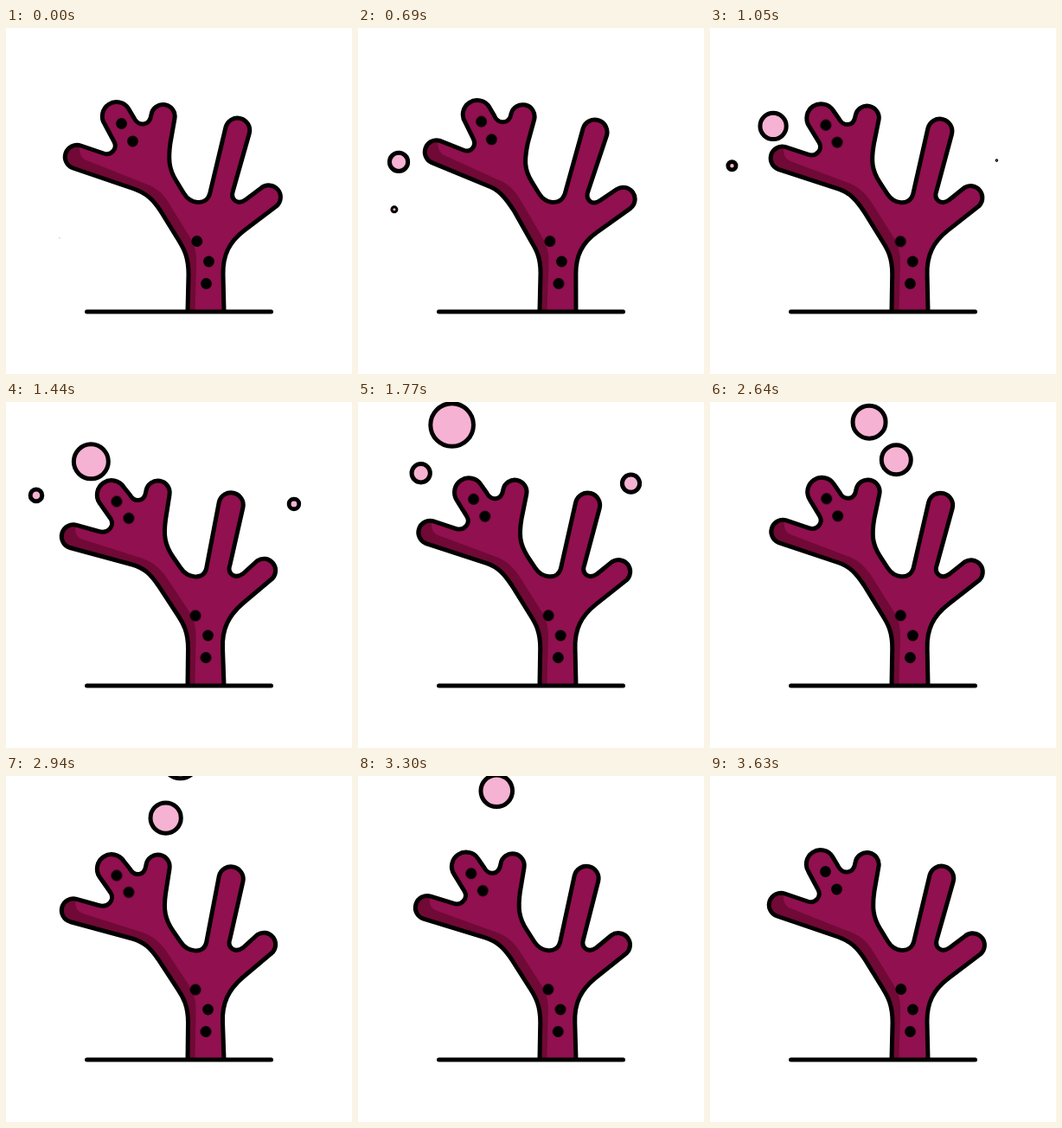
An HTML page without scripts that plays this animation: 400 px wide and 400 px high, repeating every 5750 ms.

```html
<!DOCTYPE html>
<html lang="en">
<head>
<meta charset="utf-8">
<title>Swaying coral</title>
<style>
  html, body { margin: 0; width: 100%; height: 100%; overflow: hidden; background: #fff; }
  svg { display: block; width: 100vw; height: 100vh; }

  /* coral */
  .body, .shade, .dot { animation: 5750ms cubic-bezier(.37, 0, .63, 1) infinite; }
  .body { animation-name: body; }
  .shade { animation-name: shade; fill: #700936; }
  .dot { animation-name: dot; }
  .fill { fill: #91104f; }
  .line { fill: none; stroke: #000; stroke-width: 5; stroke-linejoin: round; }

  @keyframes body {
    0%, 63.13%, 100% {
      d: path("M210 327L211 285C211 265 206 256 200 246L179 212C170 198 162 191 148 186L77.5 162A13.6 13.6 0 0 1 86.5 136L113 145C122 148 129 139 125 131.5L114 111A16.2 16.2 0 0 1 141.5 93L148 104C153 114 166 114 168 100A13.6 13.6 0 0 1 195 104.5L190 133C187.5 151 188 163 197 177L205.5 191C213 203.5 231 206 235.5 192L254 114.7A14 14 0 0 1 281.3 121.7L262.5 188C259 199 268 205 277 198.5L295 185A13.6 13.6 0 0 1 312.5 206L275.5 234C258.5 247 250.5 262 251 285L252 327");
    }
    9.65%, 39.4% {
      d: path("M210 327L211 285C211.5 266 206.5 257 200.5 247L181 212C172 198 165 189 155 184L84.8 154.3A13.6 13.6 0 0 1 94.8 129.3L123.2 140.7C132 144 138 135 134 127.5L125 108.7A16.2 16.2 0 0 1 152.5 90.5L158.5 101C162 110.5 176 112 178 99A13.6 13.6 0 0 1 204.7 105.5L197 133C193 152 192.5 163 201 177L209.5 191C217 203.5 234 206 239.5 192L261 116.3A14.2 14.2 0 0 1 288.3 124.6L266.7 188C262.5 199 271 206 280.5 199.3L299.5 186.7A13.6 13.6 0 0 1 315.5 208.7L277 236C259.5 248 251.5 263 252 286L252 327");
    }
    24.7%, 51.5% {
      d: path("M210 327L210.5 285C210.5 266 205 256 199 247L176 212C167 199 160 192 146 188L74 168.5A13.6 13.6 0 0 1 81.7 142.4L107 149.5C118 153 126 143 121 135L108 116.5A16.2 16.2 0 0 1 136 98.2L143 107C148 116 160 117 162 102.3A13.6 13.6 0 0 1 189 107.3L184.5 136C182 154 183.5 165 193 179L202 192C210 204 228 206 231.5 193L246.3 115.5A14.2 14.2 0 0 1 274 121.7L259 188C255 199 265 205 274 198.5L290.5 183.5A13.6 13.6 0 0 1 308.5 203.5L273.5 233C257.5 247 249.5 262 250.5 285L252 327");
    }
  }

  @keyframes shade {
    0%, 63.13%, 100% {
      d: path("M210 327L211 285C211 265 206 256 200 246L179 212C170 198 162 191 148 186L77.5 162A13.6 13.6 0 0 1 85 136C84 146 88 151 92.5 152.7L156 178C172 183 181 190 188 202L212 241C219 253 220.5 260 220 275L218.5 327Z");
    }
    9.65%, 39.4% {
      d: path("M210 327L211 285C211.5 266 206.5 257 200.5 247L181 212C172 198 165 189 155 184L84.8 154.3A13.6 13.6 0 0 1 93.3 129.3C92.5 139 95.5 144 100 146.3L162 175C176 180 183 189.5 190 202L212.5 241C219.5 253 221 261 220.5 275L218.5 327Z");
    }
    24.7%, 51.5% {
      d: path("M210 327L210.5 285C210.5 266 205 256 199 247L176 212C167 199 160 192 146 188L74 168.5A13.6 13.6 0 0 1 80.5 142.4C79 153 83 157 89 159L152 179C168 183.5 177 191 185 202L211 241C218 253 220 260 219.5 275L218.5 327Z");
    }
  }

  /* each dot carries its own right and left offset */
  @keyframes dot {
    0%, 63.13%, 100% { transform: translate(0, 0); }
    9.65%, 39.4% { transform: var(--r); }
    24.7%, 51.5% { transform: var(--l); }
  }

  /* bubbles */
  .bubble { fill: #f6b2d3; stroke: #000; stroke-width: 5; animation: 5750ms linear infinite; }
  .b1 { animation-name: b1; }
  .b2 { animation-name: b2; }
  .b3 { animation-name: b3; }

  @keyframes b1 {
    0% { cx: 62px; cy: 243px; r: .3px; stroke-width: .2px; }
    4% { cx: 53px; cy: 214px; r: 2.7px; stroke-width: 3.4px; }
    8% { cx: 45px; cy: 184px; r: 6.6px; stroke-width: 5px; }
    10.4% { cx: 44.5px; cy: 166px; r: 9.2px; }
    12% { cx: 47px; cy: 155px; r: 10.6px; }
    18.5% { cx: 74px; cy: 112px; r: 15.3px; }
    25.04% { cx: 98.3px; cy: 69px; r: 20px; }
    31% { cx: 109px; cy: 25px; r: 25px; }
    37.04% { cx: 114px; cy: -20.7px; r: 29.5px; }
    41.7%, 100% { cx: 116px; cy: -58px; r: 33px; stroke-width: 5px; }
  }

  @keyframes b2 {
    0%, 7.3% { cx: 57px; cy: 243px; r: 0; stroke-width: 0; }
    12% { cx: 42px; cy: 210px; r: 3px; stroke-width: 3px; }
    16% { cx: 28px; cy: 177px; r: 4.3px; stroke-width: 4.6px; }
    20.87% { cx: 22.5px; cy: 139px; r: 5px; stroke-width: 5px; }
    25.04% { cx: 34.8px; cy: 108px; r: 6.8px; }
    31.3% { cx: 76px; cy: 80px; r: 11px; }
    37.04% { cx: 117.8px; cy: 55.2px; r: 14.1px; }
    45.91% { cx: 184px; cy: 23.3px; r: 19px; }
    52.17%, 100% { cx: 205px; cy: -26px; r: 21px; stroke-width: 5px; }
  }

  @keyframes b3 {
    0%, 16.5% { cx: 330px; cy: 162px; r: 0; stroke-width: 0; }
    20.87% { cx: 333.5px; cy: 140px; r: 3px; stroke-width: 3px; }
    25.04% { cx: 333px; cy: 118px; r: 5.8px; stroke-width: 4.8px; }
    31.3% { cx: 314px; cy: 92px; r: 10.5px; stroke-width: 5px; }
    37.04% { cx: 275.8px; cy: 71px; r: 15.3px; }
    41.5% { cx: 245px; cy: 70px; r: 16.3px; }
    45.91% { cx: 215.4px; cy: 66.8px; r: 17px; }
    51.6% { cx: 182px; cy: 47px; r: 17.7px; }
    57.39% { cx: 160.3px; cy: 17.3px; r: 18.3px; }
    63.1% { cx: 153px; cy: -8px; r: 18.7px; stroke-width: 5px; }
    63.11%, 100% { cx: 153px; cy: -8px; r: 0; stroke-width: 0; }
  }
</style>
</head>
<body>
<svg viewBox="0 0 400 400">
  <path class="body fill"/>
  <path class="shade"/>
  <path class="body line"/>
  <path class="line" d="M93.5 328H306.5" stroke-linecap="round"/>
  <circle class="dot" cx="133.5" cy="110.5" r="6.4" style="--r:translate(10px,-2.8px);--l:translate(-5.6px,4.5px)"/>
  <circle class="dot" cx="146.5" cy="131" r="6.4" style="--r:translate(8.7px,-2.5px);--l:translate(-4.6px,3.4px)"/>
  <circle class="dot" cx="220.8" cy="246.5" r="6.4" style="--r:translate(1.3px,0);--l:translate(-1.8px,.5px)"/>
  <circle class="dot" cx="234.5" cy="270" r="6.4" style="--r:translate(1px,0);--l:translate(-1px,0)"/>
  <circle class="dot" cx="231.5" cy="295.5" r="6.4" style="--r:translate(.5px,0);--l:translate(-.5px,0)"/>
  <circle class="bubble b1"/>
  <circle class="bubble b2"/>
  <circle class="bubble b3"/>
</svg>
</body>
</html>
```
